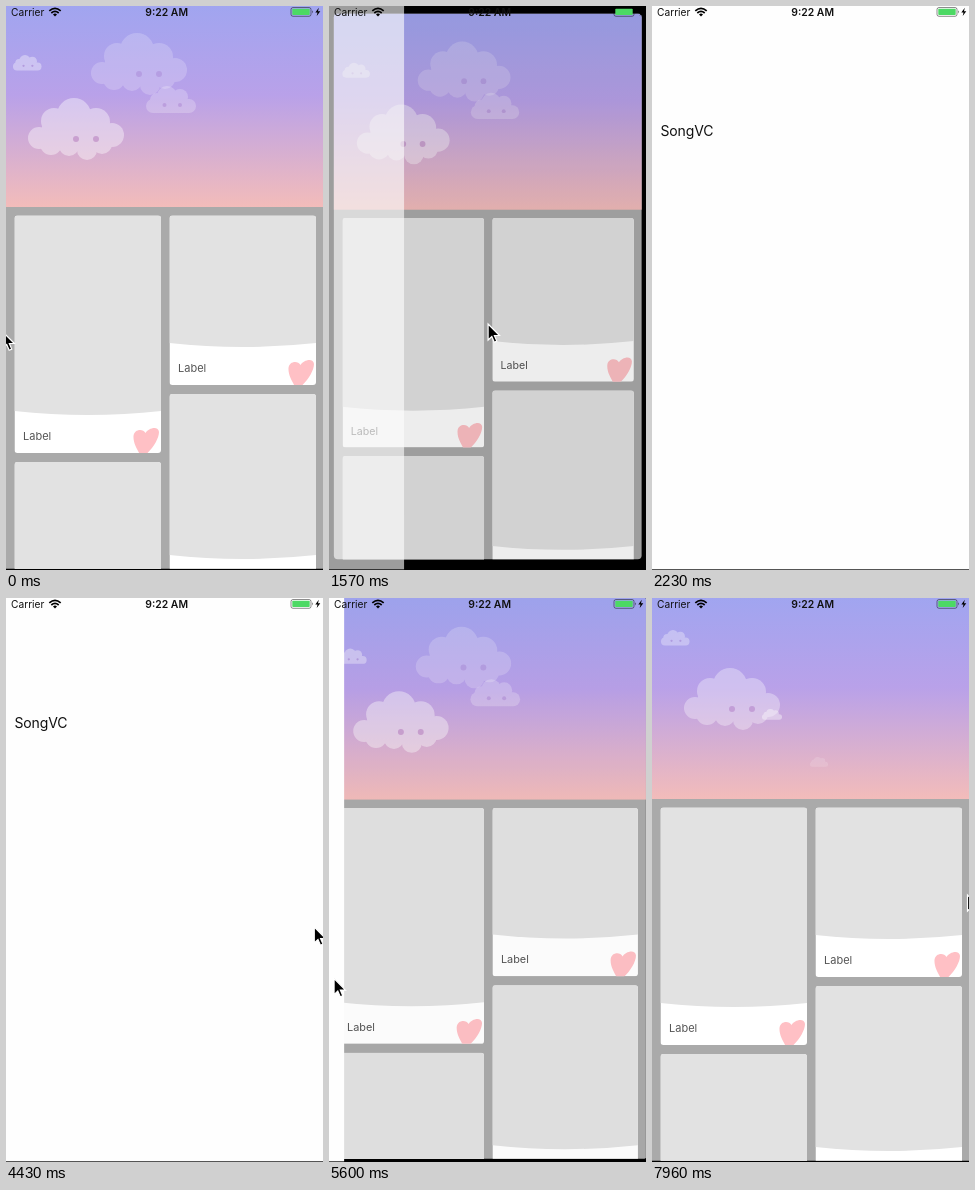
These frames come from a looping animation (317x564 px, 8 s). An HTML page:

```html
<!DOCTYPE html>
<html lang="en">
<head>
<meta charset="utf-8">
<title>Slide-over transition</title>
<style>
  html, body { margin: 0; width: 100%; height: 100%; overflow: hidden; background: #000; }
  svg { display: block; width: 317px; height: 564px; }
  text { font-family: Inter, Roboto, sans-serif; fill: #111; }
  .label { font-size: 11px; fill: #555; }
</style>
</head>
<body>
<svg viewBox="0 0 317 564">
  <defs>
    <linearGradient id="sky" x1="0" y1="0" x2="0" y2="1">
      <stop offset="0" stop-color="#a0a5f0"/>
      <stop offset=".45" stop-color="#b9a1e9"/>
      <stop offset="1" stop-color="#f3bcba"/>
    </linearGradient>
    <clipPath id="window"><rect id="frame" x="-.5" y="-2" width="318.5" height="564.7"/></clipPath>
    <!-- 96 x 62 -->
    <g id="bigCloud">
      <g fill="#fff">
        <circle cx="46" cy="17" r="17"/><circle cx="26" cy="23" r="13"/>
        <circle cx="68" cy="24" r="14"/><circle cx="11" cy="40" r="11"/>
        <circle cx="84" cy="37" r="12"/><circle cx="23" cy="46" r="11"/>
        <circle cx="41" cy="48" r="10"/><circle cx="59" cy="52" r="10"/>
        <circle cx="74" cy="46" r="10"/>
        <rect x="14" y="24" width="66" height="27" rx="5"/>
      </g>
      <g fill="#c190c6"><circle cx="48" cy="41" r="3"/><circle cx="68" cy="41" r="3"/></g>
    </g>
    <!-- 50 x 27 -->
    <g id="puff" fill="#fff">
      <circle cx="21" cy="10" r="10"/><circle cx="34" cy="11" r="8"/>
      <circle cx="11" cy="14" r="7"/><rect y="13" width="50" height="14" rx="7"/>
    </g>
    <g id="smallCloud">
      <use href="#puff"/>
      <g fill="#b890c8"><circle cx="18.5" cy="19" r="2"/><circle cx="34" cy="19" r="2"/></g>
    </g>
    <path id="heart" d="M-15.5-20C-18-25-27-24-27.5-17C-28-9-23-3-21 2L-17 3C-9-3-2-14-2-21C-2.500-28-13-25-15.500-20Z" fill="#ffc0c5"/>
  </defs>

  <rect width="317" height="564"/>
  <g id="scene" clip-path="url(#window)">
    <rect x="-2" y="-2" width="321" height="566" fill="#aaa"/>
    <rect x="-2" y="-2" width="321" height="203" fill="url(#sky)"/>
    <g id="clouds"></g>
    <g id="cards"></g>
    <rect id="dim" x="-2" y="-2" width="321" height="566"/>
  </g>

  <g id="panel">
    <rect width="317" height="563" fill="#fefefe"/>
    <rect y="563" width="317" height="1" fill="#555"/>
    <text x="8.5" y="129.5" font-size="14" letter-spacing="-.15">SongVC</text>
  </g>

  <g id="status">
    <text x="5" y="9.5" font-size="10.2">Carrier</text>
    <path d="M43.300 4.800Q49 -.2 54.700 4.800M45.300 7Q49 3.800 52.700 7" fill="none" stroke="#000" stroke-width="1.7"/>
    <path d="M47 8.500Q49 6.700 51 8.500L49 10.600Z"/>
    <text x="139.300" y="9.500" font-size="10.4" font-weight="600">9:22 AM</text>
    <rect x="285" y="1.500" width="20" height="8.800" rx="2" fill="none" stroke="#000" stroke-opacity=".5" stroke-width=".9"/>
    <rect x="286.300" y="2.700" width="17.400" height="6.400" rx=".8" fill="#4cd964"/>
    <path d="M306.200 4.300Q308 5.900 306.200 7.500Z" fill-opacity=".6"/>
    <path d="M312.800 1.800L309.300 6.400H311.500L310.700 9.900L314.300 5.200H312Z"/>
  </g>
  <path id="cursor" d="M0 0V16L3.700 12.500L6.200 18.200L8.700 17.100L6.300 11.500H11.400Z" stroke="#fff" stroke-width="1.2"/>
</svg>
<script>
  const LOOP = 8000, W = 317;
  const CLOSE = 4430, HOME = 5740, LEAVE = 6270, BACK = 7960;
  const HIDDEN = { x: -40, y: 0 };
  const $ = id => document.getElementById(id);

  // 0 before a, 1 after b, linear between
  const ramp = (t, a, b) => Math.min(1, Math.max(0, (t - a) / (b - a)));

  // Each drag has two pulls with a rest between them
  const openDrag = t => .18 * ramp(t, 110, 660) + .72 * ramp(t, 1080, 1860) ** 1.75;
  const closeDrag = t => .583 * ramp(t, CLOSE, 5220) + .571 * ramp(t, 5310, HOME);

  // Share of the stage covered by the panel
  function cover(t) {
    if (t >= CLOSE) return 1 - Math.min(1, closeDrag(t)) ** 1.576;
    const pulled = openDrag(t) ** 2.08;
    const settle = 1 - (1 - ramp(t, 1910, 2230)) ** 2;
    return pulled + (1 - pulled) * settle;
  }

  function pointer(t) {
    if (t < 3600) {
      const g = openDrag(t);
      return { x: -3 + 324 * g + 60 * ramp(t, 1860, 2100), y: 326 - 16 * g };
    }
    if (t < CLOSE) return { x: 313, y: 329 };
    if (t < HOME) {
      const g = closeDrag(t);
      return { x: 308.5 - 313 * g, y: 329 + 57 * g ** 3.2 };
    }
    if (t < LEAVE) return HIDDEN;
    if (t >= BACK) return { x: 315.5, y: 297 };
    const u = ramp(t, LEAVE, 7100);
    return { x: 13 + 313 * u, y: 367 - 60 * u };
  }

  function card(x, y, h) {
    const w = 146.5, curve = h - 42, id = `card${x}-${y}`;
    return `
      <clipPath id="${id}"><rect width="${w}" height="${h}" rx="3"/></clipPath>
      <g transform="translate(${x} ${y})" clip-path="url(#${id})">
        <rect width="${w}" height="${h}" fill="#fff"/>
        <path d="M0 0H${w}V${curve}Q${w / 2} ${curve + 8} 0 ${curve}Z" fill="#e2e2e2"/>
        <use href="#heart" x="${w}" y="${h}"/>
        <text class="label" x="8.5" y="${h - 13}">Label</text>
      </g>`;
  }

  function column(x, heights) {
    let y = 209.5, out = '';
    for (const h of heights) {
      out += card(x, y, h);
      y += h + 9;
    }
    return out;
  }
  $('cards').innerHTML = column(8.5, [237.5, 238]) + column(163.5, [169.5, 203]);

  const cloud = (shape, x, y, scale, alpha) =>
    `<use href="#${shape}" transform="translate(${x} ${y}) scale(${scale})" opacity="${alpha}"/>`;

  function clouds(t) {
    if (t < HOME) {
      const dx = 1.3 * ramp(t, 110, 1570);
      return cloud('bigCloud', 85 + dx, 27, 1, .2) + cloud('smallCloud', 140 + dx, 80, 1, .23)
        + cloud('bigCloud', 22 + dx, 92, 1, .4) + cloud('smallCloud', 7 + dx, 49, .57, .36);
    }
    const drift = ramp(t, 5910, 7060), fade = ramp(t, 7000, 7900);
    return cloud('bigCloud', 27 + 5 * drift, 65 + 5 * drift, 1, .33)
      + cloud('smallCloud', 9, 34 - 2 * drift, .57, .32)
      + cloud('puff', 110, 111, .4, .4 * fade) + cloud('puff', 158, 159, .36, .14 * fade);
  }

  function draw(t) {
    const p = cover(t), { x, y } = pointer(t);
    $('scene').setAttribute('transform',
      `translate(158.5 281) scale(${1 - .143 * p}) translate(-158.5 -281)`);
    $('frame').setAttribute('rx', Math.min(4, p * 30));
    $('dim').setAttribute('opacity', .3 * p);
    $('panel').setAttribute('transform', `translate(${(p - 1) * W} 0)`);
    $('panel').setAttribute('opacity', t < CLOSE ? .5 + .5 * p : 1);
    $('cursor').setAttribute('transform', `translate(${x} ${y})`);
    $('clouds').innerHTML = clouds(t);
  }

  const start = performance.now();
  function tick() {
    draw((performance.now() - start) % LOOP);
    requestAnimationFrame(tick);
  }
  tick();
</script>
</body>
</html>
```
